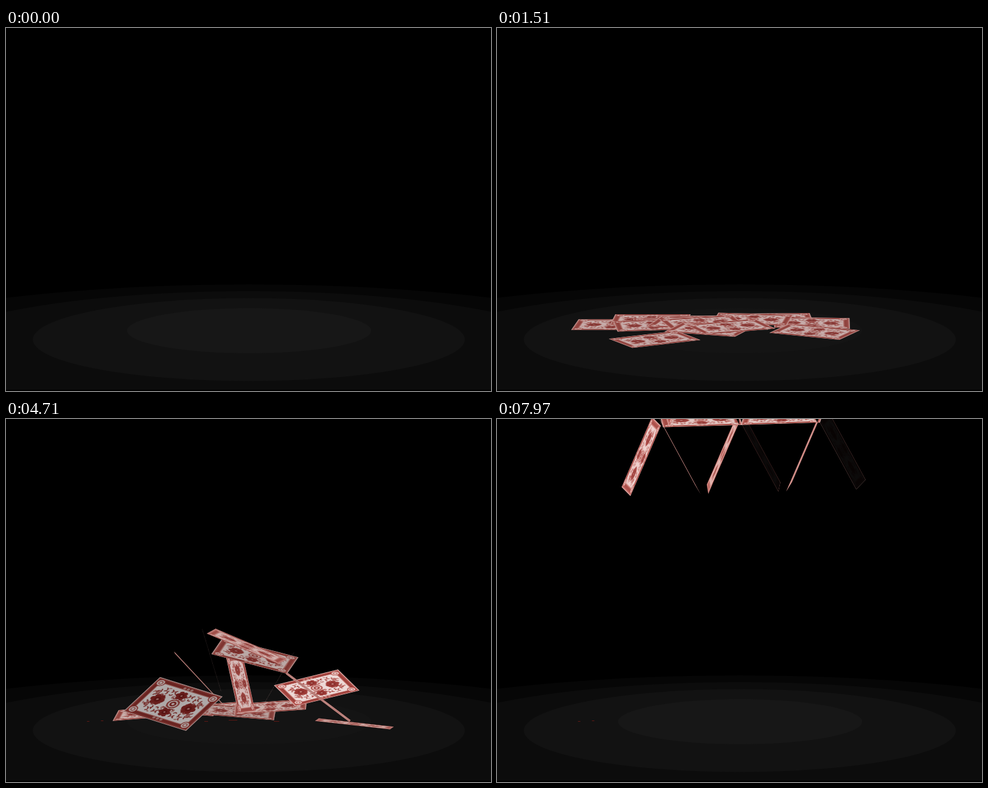
Recreate the animation shown at these times as an HTML page with a canvas. Size 797 by 596 pixels, loop 8000 ms.

```html
<!DOCTYPE html>
<html lang="en">
<head>
<meta charset="utf-8">
<title>Falling house of cards</title>
<style>
html, body { margin: 0; height: 100%; overflow: hidden; background: #000; }
canvas { display: block; }
</style>
</head>
<body>
<canvas id="stage" width="797" height="596"></canvas>
<script>
const ctx = document.getElementById('stage').getContext('2d');
const LOOP = 8000, IMPACT = 340, GROUND = 485, COUNT = 15;
const LONG = 124, SHORT = 88;
const REST_SHADE = .17;
const lerp = (a, b, p) => a + (b - a) * p;
const clamp = p => Math.min(1, Math.max(0, p));
const mix = (a, b, p) => a.map((n, i) => lerp(n, b[i], p));

// A card is an origin corner, its long side, its short side and a shade.
// A sheet seen edge-on needs no short side.
const key = (x, y, ux, uy, vx = 4, vy = 0, shade = .1) => [x, y, ux, uy, vx, vy, shade];

// The airborne cards at the time "mid", back to front; all others drop at once.
const first = {
  mid: 600, land: 820, stop: 1340, left: 191, right: 514, swing: -.55, flip: -1,
  airborne: [
    key(328, 356, 0, 125, 18, -4),
    key(323, 336, 48, 110),
    key(336, 431, 110, 47, -15, 11, .2),
    key(506, 465, 86, 28, -54, 23, .3),
    key(224, 397, 107, 10, -37, 89, 0)
  ]
};
const second = {
  mid: 440, land: 1000, stop: 1400, left: 240, right: 470, swing: .6, flip: 1,
  airborne: [
    key(278, 362, 88, 122),
    key(330, 315, 12, 125),
    key(368, 374, -1, 112, 36, -8),
    key(356, 334, 125, 38, -19, 29, .25),
    key(344, 317, 117, 59, -13, 6),
    key(436, 430, 102, -33, 47, 38, 0),
    key(489, 361, -89, 108),
    key(460, 403, 102, 93),
    key(510, 493, 125, 14, 0, 2),
    key(253, 408, 104, 36, -61, 65, .34)
  ]
};
const runs = [
  { from: 170, to: 3830, fall: first },
  { from: 4030, to: 7650, fall: second },
  { from: 7880, to: LOOP, fall: first }
];

function makeCard() {
  const w = 250, h = 176, scale = .56;
  const canvas = document.createElement('canvas');
  canvas.width = w * scale;
  canvas.height = h * scale;
  const g = canvas.getContext('2d');
  g.scale(scale, scale);
  const disc = (x, y, r, color) => {
    g.fillStyle = color;
    g.beginPath();
    g.arc(x, y, r, 0, 7);
    g.fill();
  };
  const rings = (x, y, list) => list.forEach(([r, color]) => disc(x, y, r, color));
  const box = (inset, color) => {
    g.fillStyle = color;
    g.fillRect(inset, inset, w - 2 * inset, h - 2 * inset);
  };
  box(0, '#f0cfca');
  box(3, '#b04a44');
  box(8, '#98332e');
  box(18, '#c8736c');
  box(21, '#fbf3f1');
  g.translate(w / 2, h / 2);
  const mirrored = paint => {
    for (const sx of [-1, 1]) for (const sy of [-1, 1]) {
      g.save();
      g.scale(sx, sy);
      paint();
      g.restore();
    }
  };

  let seed = 11;
  const random = () => (seed = seed * 16807 % 2147483647) / 2147483647;
  g.lineWidth = 4;
  for (let i = 0; i < 30; i++) {
    const x = 6 + random() * 88, y = 6 + random() * 52, r = 3 + random() * 5, turn = random() * 6;
    if (x > 76 && y > 43) continue;
    g.strokeStyle = i % 3 ? '#a33a36' : '#cc827d';
    mirrored(() => {
      g.beginPath();
      g.arc(x, y, r, turn, turn + 3);
      g.stroke();
    });
  }
  const flower = (x, y, r) => {
    for (let a = 0; a < 6; a++) disc(x + r * Math.cos(a * 1.047), y + r * Math.sin(a * 1.047), r * .6, '#952a27');
    rings(x, y, [[r * .7, '#7d1d1b'], [r * .25, '#d99a94']]);
  };
  for (const side of [-1, 1]) {
    flower(side * 62, 0, 16);
    flower(0, side * 41, 13);
    for (const x of [-14, 0, 14]) disc(x, side * 74, 5, '#d59a94');
  }
  rings(0, 0, [[21, '#b04a45'], [16, '#f6e4e1'], [11, '#9a2f2b'], [5, '#f6e4e1']]);
  mirrored(() => rings(104, 67, [[16, '#a8322d'], [13, '#f4dedb'], [8, '#b9524c'], [5, '#f8ebe9']]));
  return canvas;
}
const card = makeCard();

// Upright sheet in one-point perspective, given its centre line.
function sheet(x1, y1, x2, y2, shade) {
  const dx = .09 * ((x1 + x2) / 2 - 398), dy = .09 * ((y1 + y2) / 2 - 225);
  return [x1 - dx / 2, y1 - dy / 2, x2 - x1, y2 - y1, dx, dy, shade];
}

// Card lying on the floor around a centre.
function flat(x, y, yaw) {
  const project = (X, Z) => [X + Z * (x - 398) / 1500, .2 * Z];
  const [ux, uy] = project(LONG * Math.cos(yaw), LONG * Math.sin(yaw));
  const [vx, vy] = project(-SHORT * Math.sin(yaw), SHORT * Math.cos(yaw));
  return [x - (ux + vx) / 2, y - (uy + vy) / 2, ux, uy, vx, vy, REST_SHADE];
}

const centerX = ([x, , ux, , vx]) => x + (ux + vx) / 2;

// Three storeys of tents with a ceiling between neighbours, bottom up.
function house(base) {
  const cards = [], rise = 114;
  const tilt = x => -.03 * (x - 213);
  const add = (x1, y1, x2, y2, shade) => cards.push(sheet(x1, y1 + tilt(x1), x2, y2 + tilt(x2), shade));
  for (let level = 0; level < 3; level++) {
    const low = base - level * (rise + 3), top = low - rise;
    const apex = i => 266 + 134 * (i + level / 2);
    for (let i = 0; i < 3 - level; i++) {
      const x = apex(i);
      add(x - 54, low, x - 4, top, 0);
      add(x + 3, top, x + 64, low, x > 330 ? .95 : 0);
    }
    for (let i = 0; i < 2 - level; i++) add(apex(i) + 4, top, apex(i + 1), top, .05);
  }
  return cards;
}
const landed = house(GROUND);

function poses(fall, t) {
  const s = t - 90;
  if (t < IMPACT) return house(Math.min(GROUND, 118 + 1.2 * s + .00105 * s * s));

  const { mid, land, stop, left, right, swing, flip, airborne } = fall;
  const droppers = COUNT - airborne.length;
  const burst = clamp((t - IMPACT) / (mid - IMPACT));
  const drop = clamp((t - mid) / (land - mid));
  const slide = clamp((t - land) / (stop - land));
  const settle = .95 * drop * drop + .05 * slide * (2 - slide);

  return landed.map((start, i) => {
    const flying = airborne[i - droppers];
    const front = i / (COUNT - 1);
    const x = flying ? centerX(flying) : lerp(left, right, (centerX(start) - 238) / 326);
    const y = 482 + 5 * Math.cos(i * 4) + 25 * front ** 5;
    const rest = flat(x, y, swing * flip ** i * front ** 2);
    const thrown = flying || mix(start, rest, .9);
    return t < mid ? mix(start, thrown, burst) : mix(thrown, rest, settle);
  });
}

function drawCard([x, y, ux, uy, vx, vy, shade]) {
  const area = Math.abs(ux * vy - uy * vx);
  ctx.setTransform(ux, uy, vx, vy, x, y);
  ctx.drawImage(card, 0, 0, 1, 1);
  ctx.fillStyle = `rgba(212,138,130,${.5 * clamp(1 - area / 7000)})`;
  ctx.fillRect(0, 0, 1, 1);
  ctx.fillStyle = `rgba(0,0,0,${shade})`;
  ctx.fillRect(0, 0, 1, 1);
}

function ellipse(x, y, rx, ry, color) {
  ctx.fillStyle = color;
  ctx.beginPath();
  ctx.ellipse(x, y, rx, ry, 0, 0, 7);
  ctx.fill();
}

function drawFloor(lit) {
  ctx.fillStyle = '#000';
  ctx.fillRect(0, 0, 797, 596);
  ellipse(399, 565, 750, 144, '#060606');
  ellipse(399, 546, 560, 114, '#0c0c0c');
  ellipse(399, 511.5, 355, 68, '#121212');
  ellipse(399.5, 497, 200.5, 37, lit ? '#171717' : '#141414');
  ctx.fillStyle = '#000';
  ctx.fillRect(0, 594, 797, 2);
}

// Short traces left on the floor by the first pile: x, y, length.
const traces = [[133, 496, 4], [156, 495, 4], [326, 496, 6], [366, 494, 14], [440, 496, 9]];

function draw(time) {
  const run = runs.find(r => time >= r.from && time < r.to);
  const t = run ? time - run.from : 0;
  ctx.setTransform(1, 0, 0, 1, 0, 0);
  drawFloor(t < IMPACT);
  if (time >= first.stop + 2490) {
    ctx.fillStyle = '#5c1814';
    for (const [x, y, w] of traces.slice(0, time < 7650 ? 5 : 2)) ctx.fillRect(x, y, w, 1);
  }
  if (run) poses(run.fall, t).forEach(drawCard);
}

ctx.imageSmoothingQuality = 'high';
const begin = performance.now();
function frame() {
  draw((performance.now() - begin) % LOOP);
  requestAnimationFrame(frame);
}
frame();
</script>
</body>
</html>
```
